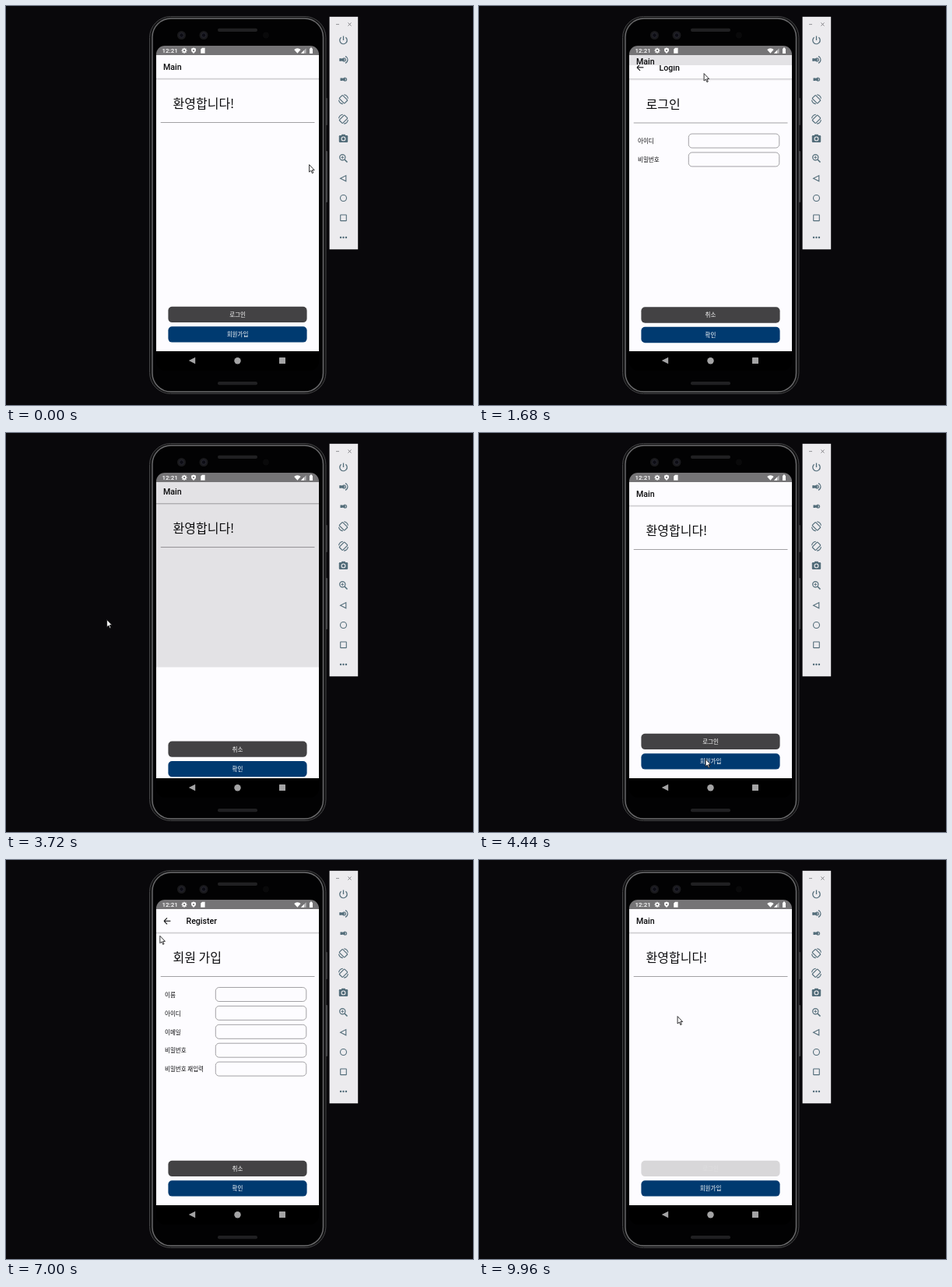
An HTML page with a canvas for the animation above (10 s loop, 600 by 512 pixels).

```html
<!DOCTYPE html>
<html lang="ko">
<head>
<meta charset="utf-8">
<style>
html, body { margin: 0; width: 100%; height: 100%; overflow: hidden; background: #09080b; }
canvas { display: block; }
</style>
</head>
<body>
<canvas id="stage" width="600" height="512"></canvas>
<script>
const ctx = document.getElementById('stage').getContext('2d');
const LOOP = 10000, STEP = 40;
const TOP = 63, HEIGHT = 380, LEFT = 193, WIDTH = 209;
const INK = '#0b0b0d', PAPER = '#fdfcff', TOOL = '#536d7a', PANEL = '#ecebee';
const LATIN = 'Roboto, sans-serif';
const HANGUL = '"Noto Sans CJK KR", "Noto Sans CJK", sans-serif';

const clamp = v => Math.max(0, Math.min(1, v));
const mix = (a, b, u) => a + (b - a) * u;

// The pointer rests between moves; sway bends a move away from the straight line.
const home = [389, 203], loginSpot = [290, 394], backSpot = [208, 75];
const moves = [
  { from: 120, until: 640, to: loginSpot, sway: [-90, 60] },
  { from: 1280, until: 1680, to: [288.5, 86] },
  { from: 1680, until: 1920, to: [143, 100] },
  { from: 1920, until: 3080, to: backSpot, sway: [285, 350] },
  { from: 3320, until: 3720, to: [129, 239] },
  { from: 3720, until: 4400, to: [290.5, 418] },
  { from: 4920, until: 5560, to: [502, 142], sway: [0, -170] },
  { from: 5560, until: 7120, to: backSpot, sway: [-150, 390] },
  { from: 7320, until: 7800, to: [269.5, 94], sway: [-50, 30] },
  { from: 7800, until: 9560, to: [332, 398.5], sway: [-100, 0] },
  { from: 9720, until: 9960, to: [254.5, 200] }
];

function cursorAt(t) {
  let [x, y] = home;
  for (const { from, until, to, sway = [0, 0] } of moves) {
    if (t < from) break;
    const u = clamp((t - from) / (until - from));
    const s = u * u * (3 - 2 * u);
    x = mix(x, to[0], s) + sway[0] * Math.sin(Math.PI * s * s);
    y = mix(y, to[1], s) + sway[1] * Math.sin(Math.PI * s);
  }
  return [x, y];
}

// Cubic bezier timing (0.20833, 0.82, 0.25, 1), solved by bisection.
function ease(x) {
  if (x <= 0) return 0;
  if (x >= 1) return 1;
  const curve = (u, a, b) => 3 * u * (1 - u) ** 2 * a + 3 * u * u * (1 - u) * b + u ** 3;
  let lo = 0, hi = 1;
  for (let i = 0; i < 24; i++) {
    const mid = (lo + hi) / 2;
    if (curve(mid, 0.20833, 0.25) < x) lo = mid; else hi = mid;
  }
  return curve(lo, 0.82, 1);
}

const visits = [
  { open: 1432, close: 3641, title: 'Login', heading: '로그인', fields: ['아이디', '비밀번호'] },
  { open: 5075, close: 7617, title: 'Register', heading: '회원 가입',
    fields: ['이름', '아이디', '이메일', '비밀번호', '비밀번호 재입력'] }
];
const shown = (v, t) => ease((t - v.open) / 425) - ease((t - v.close) / 425);

const inOut = u => u < 0.5 ? 2 * u * u : 1 - 2 * (1 - u) ** 2;
function pressOpacity(t, down, up) {
  return 1 - 0.8 * (inOut(clamp((t - down) / 150)) - inOut(clamp((t - up) / 250)));
}

function text(str, x, y, font, color = INK, align = 'left') {
  ctx.font = font;
  ctx.fillStyle = color;
  ctx.textAlign = align;
  ctx.fillText(str, x, y);
}

function paint(fill, stroke, line = 1) {
  if (fill) { ctx.fillStyle = fill; ctx.fill(); }
  if (stroke) { ctx.strokeStyle = stroke; ctx.lineWidth = line; ctx.stroke(); }
}

function box(x, y, w, h, r, fill, stroke, line) {
  ctx.beginPath();
  ctx.roundRect(x, y, w, h, r);
  paint(fill, stroke, line);
}

function disc(x, y, r, fill, stroke, line) {
  ctx.beginPath();
  ctx.arc(x, y, r, 0, 7);
  paint(fill, stroke, line);
}

function arc(x, y, r, a, b, color, line) {
  ctx.beginPath();
  ctx.arc(x, y, r, a, b);
  paint(null, color, line);
}

function poly(points, fill, stroke, line) {
  ctx.beginPath();
  points.forEach(([x, y]) => ctx.lineTo(x, y));
  ctx.closePath();
  paint(fill, stroke, line);
}

function stroke(x1, y1, x2, y2, color, line) {
  ctx.beginPath();
  ctx.moveTo(x1, y1);
  ctx.lineTo(x2, y2);
  paint(null, color, line);
}

// Left-pointing triangle.
const arrow = (x, y, r, ...style) => poly([[x - r, y], [x + r, y - r], [x + r, y + r]], ...style);

function phone() {
  box(410, 118, 3, 35, 1, '#38383a');
  box(410, 186, 3, 66, 1, '#4a4a4c');
  box(184.5, 13.5, 226.5, 484, 27, '#121213', '#434345');
  box(188, 16, 219.5, 479, 24, '#030304', '#6c6c6e', 1.4);
  box(190.5, 18.5, 214.5, 474, 22, '#020203');
  for (const y of [28.8, 482]) box(272, y, 51, 4.2, 2, '#202022');
  for (const x of [225.5, 254]) {
    disc(x, 37.5, 5.5, '#19191c');
    disc(x, 37.5, 2.8, '#0c0c13', '#2b2b38', 0.8);
  }
  disc(334, 37.5, 4, '#09090a');
  box(LEFT, 51, WIDTH, 417, 12, '#000');
  box(LEFT, 51, WIDTH, 12, [11, 11, 0, 0], '#757476');
  statusBar();
  const grey = '#a4a4a5';
  arrow(239, 455, 4.2, grey);
  disc(297.5, 455.2, 4.2, grey);
  box(351, 451, 8, 8, 0.5, grey);
}

function statusBar() {
  const white = '#fff', bar = '#757476';
  text('12:21', 200.5, 60.2, '500 8px ' + LATIN, white);
  for (let i = 0; i < 8; i++) {
    const a = i * Math.PI / 4;
    stroke(229, 57.2, 229 + 3.5 * Math.cos(a), 57.2 + 3.5 * Math.sin(a), white, 1.3);
  }
  disc(229, 57.2, 1.8, bar, white, 1.3);
  poly([[241, 53.4], [244, 54.7], [243.8, 58], [241, 61], [238.2, 58], [238, 54.7]], white);
  disc(241, 57, 1.1, bar);
  poly([[252, 53.8], [255.6, 53.8], [255.6, 60.7], [250.2, 60.7], [250.2, 55.6]], white);
  ctx.beginPath();
  ctx.moveTo(374.4, 60.8);
  ctx.arc(374.4, 60.2, 6, -2.35, -0.79);
  ctx.closePath();
  paint(white);
  poly([[379, 60.8], [385.6, 60.8], [385.6, 54.2]], '#b5b4b6');
  poly([[379, 60.8], [383, 60.8], [383, 56.8]], white);
  box(390, 54.4, 4, 6.6, 0.5, white);
  box(391, 53.5, 2, 1.5, 0, white);
}

function button(label, y, color, opacity = 1) {
  ctx.save();
  ctx.globalAlpha = opacity;
  box(208.4, y, 178.2, 20.3, 5, color);
  text(label, 297.5, y + 13, '7.5px ' + HANGUL, '#fff', 'center');
  ctx.restore();
}

function page(title, heading, labels, opacities, back) {
  ctx.fillStyle = PAPER;
  ctx.fillRect(LEFT, TOP, WIDTH, HEIGHT + 20);
  ctx.fillStyle = '#bebdc0';
  ctx.fillRect(LEFT, 92.8, WIDTH, 1);
  ctx.fillStyle = '#e6e5e8';
  ctx.fillRect(LEFT, 93.8, WIDTH, 1);
  text(title, back ? 231.5 : 202, 82.2, '500 10.64px ' + LATIN);
  if (back) {
    stroke(211.4, 78.3, 203.4, 78.3, INK, 1.1);
    for (const d of [-4, 4]) stroke(203, 78.3, 203 + Math.abs(d), 78.3 + d, INK, 1.1);
  }
  text(heading, 214.5, 131.2, '16px ' + HANGUL);
  ctx.fillStyle = '#98979a';
  ctx.fillRect(198.7, 149, 197.8, 0.9);
  button(labels[0], 385.8, '#434244', opacities[0]);
  button(labels[1], 411.3, '#003a70', opacities[1]);
}

function form(visit) {
  page(visit.title, visit.heading, ['취소', '확인'], [1, 1], true);
  visit.fields.forEach((label, i) => {
    const y = 163.5 + i * 23.9;
    text(label, 204, y + 12.2, '7.5px ' + HANGUL);
    box(269.3, y, 116.5, 18, 4.5, null, '#99989b', 0.9);
  });
}

function app(t) {
  const visit = visits.find(v => shown(v, t) > 0.0005);
  const p = visit ? shown(visit, t) : 0;
  ctx.save();
  ctx.beginPath();
  ctx.rect(LEFT, TOP, WIDTH, HEIGHT);
  ctx.clip();

  ctx.save();
  ctx.translate(0, -HEIGHT * 0.02 * p);
  const login = pressOpacity(t, 920, 1280) * pressOpacity(t, 9720, Infinity);
  const register = pressOpacity(t, 4560, 4920);
  page('Main', '환영합니다!', ['로그인', '회원가입'], [login, register]);
  ctx.restore();

  if (visit) {
    ctx.fillStyle = `rgba(0,0,0,${0.1 * clamp(p / 0.36)})`;
    ctx.fillRect(LEFT, TOP, WIDTH, HEIGHT);
    const drop = HEIGHT * (1 - p);
    ctx.beginPath();
    ctx.rect(LEFT, TOP + drop, WIDTH, HEIGHT);
    ctx.clip();
    ctx.translate(0, drop * 0.041);
    form(visit);
  }
  ctx.restore();
}

function speaker(x, y, waves) {
  box(x, y - 1.8, 3, 3.6, 0, TOOL);
  arrow(x + 3.4, y, 2.9, TOOL);
  for (let i = 0; i < waves; i++) arc(x + 6, y, 2 + i * 2.6, -1.2, 1.2, TOOL, 1.3);
}

function rotateIcon(x, y, flip) {
  ctx.save();
  ctx.translate(x, y);
  ctx.scale(flip, 1);
  ctx.rotate(Math.PI / 4);
  box(-4.7, -3, 9.4, 6, 0.8, null, TOOL, 1.2);
  for (const a of [0, Math.PI]) arc(0, 0, 6, a + 0.9, a + 2.2, TOOL, 1.1);
  ctx.restore();
}

function toolbar() {
  const x = 433.5;
  ctx.fillStyle = PANEL;
  ctx.fillRect(415.6, 13.8, 36.6, 298.5);
  stroke(424, 23.6, 428, 23.6, '#8a8a8d', 0.9);
  for (const s of [-2, 2]) stroke(441.5 - s, 21.5, 441.5 + s, 25.5, '#77777a', 0.9);

  arc(x, 44, 4.7, -0.9, Math.PI + 0.9, TOOL, 1.3);
  stroke(x, 38.5, x, 44, TOOL, 1.3);
  speaker(428.3, 69, 2);
  speaker(429.5, 94.2, 1);
  rotateIcon(x, 119.7, 1);
  rotateIcon(x, 145.2, -1);

  box(x - 5.7, 166, 11.4, 9, 1.2, TOOL);
  box(x - 2.5, 164.7, 5, 2, 0.8, TOOL);
  disc(x, 170.4, 2.4, TOOL, PANEL, 1.1);

  disc(432.3, 194.3, 3.6, null, TOOL, 1.2);
  stroke(435, 197, 438.5, 200.5, TOOL, 1.6);
  stroke(430.4, 194.3, 434.2, 194.3, TOOL, 0.9);
  stroke(432.3, 192.4, 432.3, 196.2, TOOL, 0.9);

  arrow(x - 0.3, 221.2, 3.6, null, TOOL, 1.1);
  disc(x, 246.5, 4, null, TOOL, 1.1);
  box(429.7, 268, 7.6, 7.6, 0.4, null, TOOL, 1.1);
  for (const d of [-3.5, 0, 3.5]) disc(x + d, 297, 1.2, TOOL);
}

function cursor(t) {
  const [x, y] = cursorAt(t);
  const shape = [[0, 0], [0, 9.4], [2.2, 7.5], [3.8, 11], [5.2, 10.4], [3.7, 7], [6.6, 7]];
  ctx.lineJoin = 'round';
  poly(shape.map(([dx, dy]) => [x + 0.6 + dx, y + 0.6 + dy]), '#fff', '#1a1a1c', 0.9);
  ctx.lineJoin = 'miter';
}

function render(t) {
  ctx.fillStyle = '#09080b';
  ctx.fillRect(0, 0, 600, 512);
  phone();
  toolbar();
  app(t);
  cursor(t);
}

const start = performance.now();
function tick() {
  const t = (performance.now() - start) % LOOP;
  render(Math.floor(t / STEP) * STEP);
  requestAnimationFrame(tick);
}
tick();
</script>
</body>
</html>
```
